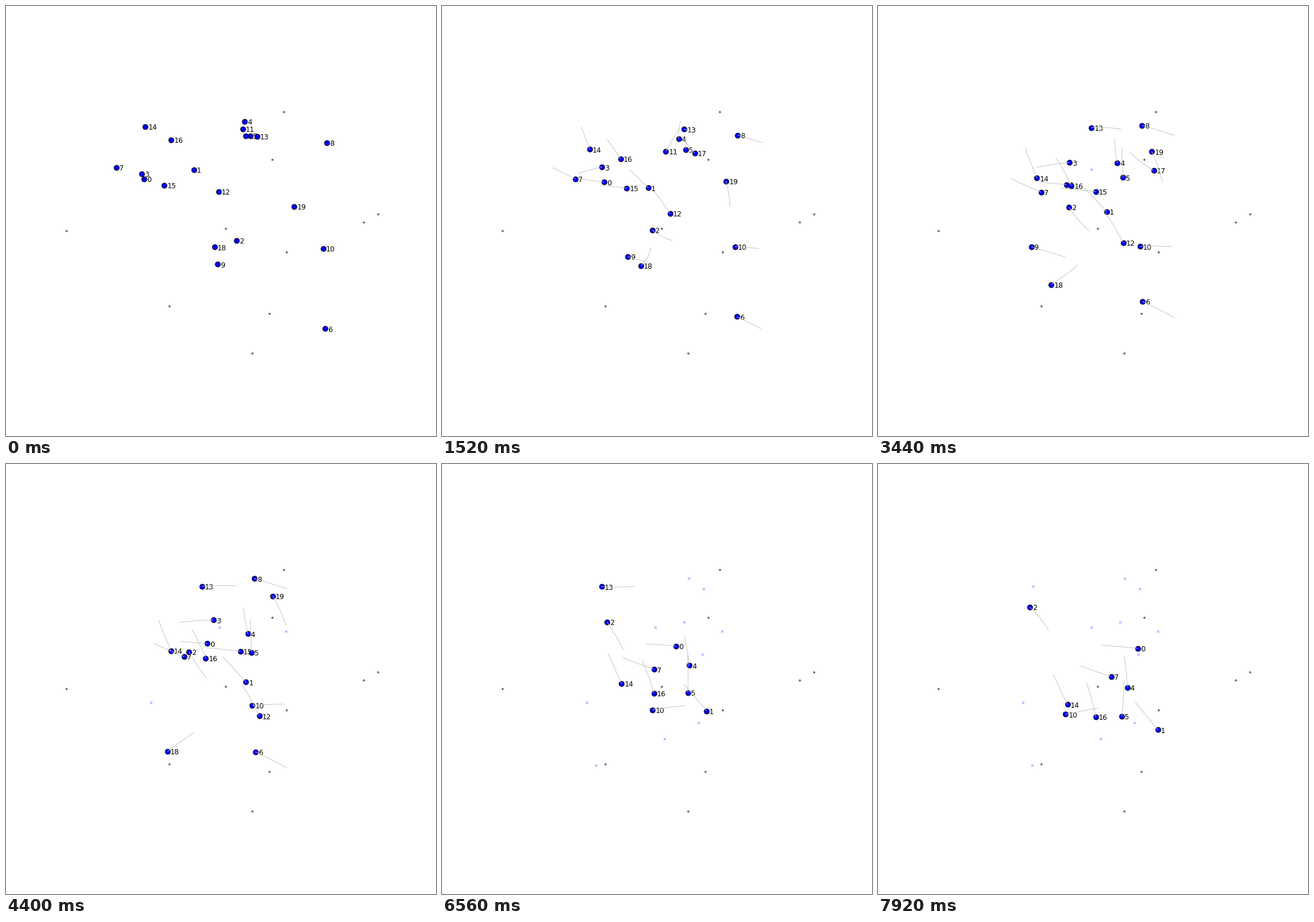
Write a matplotlib script that moves like this. It is 748 px wide and 748 px high and loops after 8 s.

```python
import numpy as np
import matplotlib.pyplot as plt
from matplotlib.animation import FuncAnimation

SIZE, DPI = 748, 100
FRAMES, INTERVAL = 100, 80
TRAIL = 25
PX = 72 / DPI

OBSTACLES = [(483, 184), (463, 267), (382, 387), (647, 361.5), (622, 375.5),
             (488.5, 428), (105, 390.5), (284.5, 522), (458.5, 534.5), (428.5, 603.5)]

fig = plt.figure(figsize=(SIZE / DPI, SIZE / DPI), dpi=DPI, facecolor="white")
ax = fig.add_axes([0, 0, 1, 1])
ax.set(xlim=(0, SIZE), ylim=(SIZE, 0))
ax.axis("off")


class Walker:
    """A numbered agent on a smooth curve through key points evenly spaced in time."""

    def __init__(self, name, *keys, arrival=None):
        self.arrival = arrival or FRAMES
        self.goal = keys[-1]
        degree = len(keys) - 1
        curve = np.polyfit(np.linspace(0, 1, len(keys)), keys, degree)
        progress = np.arange(FRAMES) / (arrival or FRAMES - 1)
        self.path = np.vander(progress, degree + 1) @ curve
        self.label = ax.text(0, 0, str(name), family="DejaVu Sans", size=12.3 * PX,
                             color="black", va="baseline", zorder=3)

    def trail(self, k):
        return np.vstack([self.path[max(0, k - TRAIL):k + 1], [(np.nan, np.nan)]])


walkers = [
    Walker(0, (240, 301), (309, 309), (372, 314), (452, 320.5)),
    Walker(1, (327, 285), (408.5, 369.5), (486.5, 462.5)),
    Walker(2, (401, 408), (345, 368), (306, 305), (264, 249)),
    Walker(3, (236, 291.5), (326, 273), (421, 274.5), arrival=80),
    Walker(4, (415, 200.5), (413.5, 255), (425, 317), (433.5, 388.5)),
    Walker(5, (425.5, 226), (425, 276), (428, 356), (424, 439)),
    Walker(6, (555, 561.5), (387.5, 477.5), arrival=76),
    Walker(7, (192, 281), (298, 330), (406, 370)),
    Walker(8, (558, 238), (429.5, 198.5), arrival=56),
    Walker(9, (368, 449.5), (252.5, 414.5), arrival=49),
    Walker(10, (552, 422), (441, 419), (326.5, 435.5)),
    Walker(11, (412, 213.5), (371.5, 283.5), arrival=34),
    Walker(12, (370, 323), (411, 384), (446.5, 449.5), arrival=60),
    Walker(13, (437, 226.5), (404, 212), (334.5, 213), (270.5, 212.5), arrival=86),
    Walker(14, (242.5, 210), (282, 313), (329.5, 418.5)),
    Walker(15, (275.5, 312), (453.5, 330.5), arrival=74),
    Walker(16, (287.5, 232.5), (342.5, 326), (379, 440)),
    Walker(17, (417.5, 226), (446, 262), (487.5, 290.5), arrival=47),
    Walker(18, (363, 419.5), (337, 459.5), (291, 492), (268.5, 523.5), arrival=73),
    Walker(19, (501.5, 349), (486.5, 278.5), (455.5, 216.5), arrival=62),
]


def layer(zorder, **style):
    line = ax.plot([], [], zorder=zorder, **style)[0]
    line.set_snap(False)
    return line


def put(line, points):
    line.set_data(*np.reshape(points, (-1, 2)).T)


obstacles = layer(1, ls="", marker="D", ms=3.4 * PX, mew=0, color="#707070")
put(obstacles, OBSTACLES)
goals = layer(2, ls="", marker="x", ms=5 * PX, mew=0.8 * PX, color="#8080ff")
dots = layer(4, ls="", marker="o", ms=9 * PX, mew=PX, mfc="#0000ff", mec="black")
trails = layer(5, color="#c0c0c0", lw=0.9 * PX, solid_capstyle="butt")


def update(k):
    active = [w for w in walkers if k < w.arrival]
    put(goals, [w.goal for w in walkers if w not in active])
    put(dots, [w.path[k] for w in active])
    put(trails, np.vstack([w.trail(k) for w in active]))
    for w in walkers:
        w.label.set_visible(w in active)
        w.label.set_position(w.path[k] + (5, 5.3))
    return goals, dots, trails


anim = FuncAnimation(fig, update, frames=FRAMES, interval=INTERVAL, repeat=True, repeat_delay=0)
plt.show()
```
